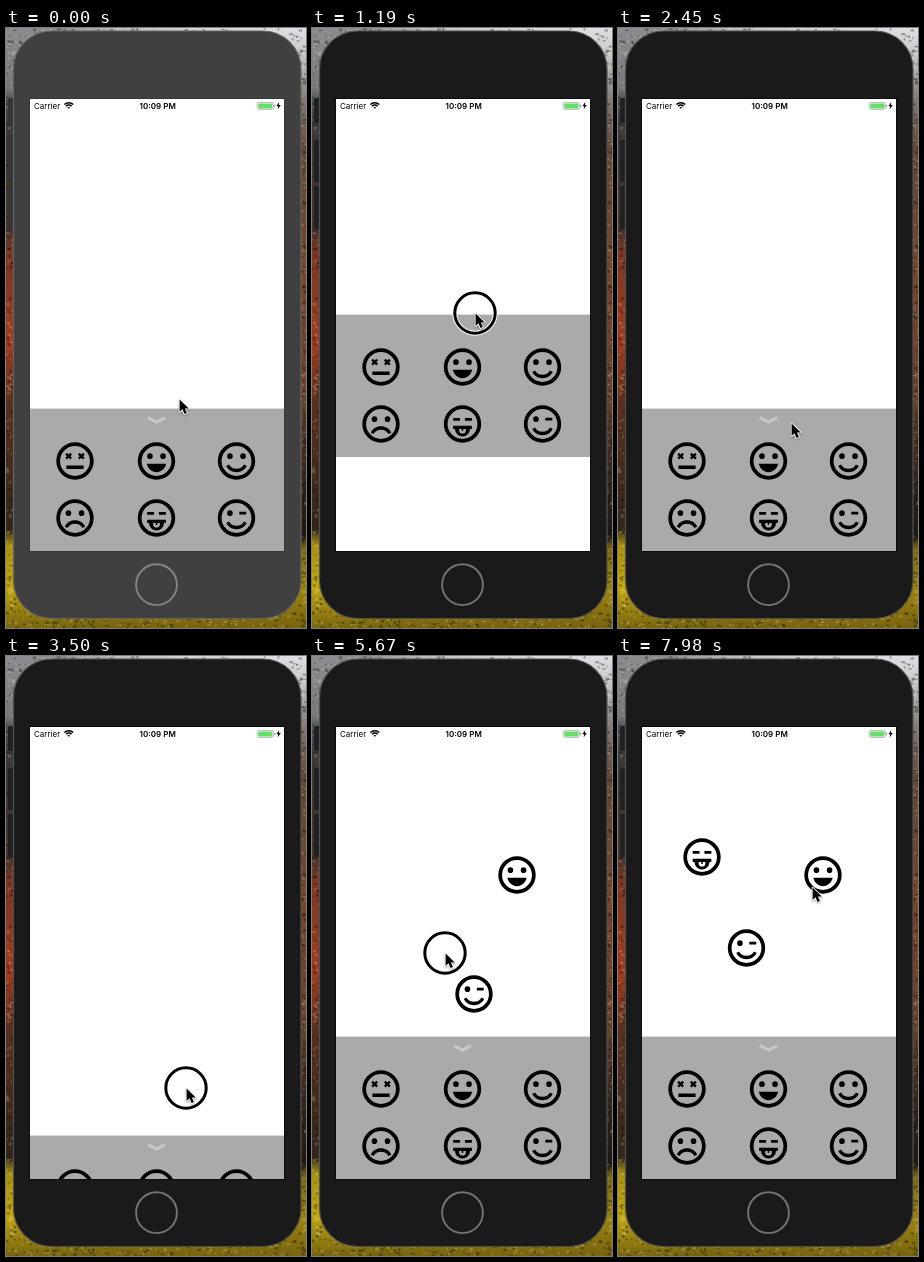
Write an HTML page with a canvas that moves like this. It is 300x600 px and loops after 8000 ms.

```html
<!DOCTYPE html>
<html lang="en">
<head>
<meta charset="utf-8">
<title>Emoticon tray</title>
<style>
  html, body { margin: 0; width: 100%; height: 100%; overflow: hidden; }
  canvas { display: block; width: 300px; height: 600px; }
</style>
</head>
<body>
<canvas id="stage" width="300" height="600"></canvas>
<script>
const canvas = document.getElementById('stage');
const ctx = canvas.getContext('2d');
const LOOP = 8000, STEP = 70, LAG = 120, FOCUS_AT = 420;
const OPEN = 381, CLOSED = 505;

// Pointer path: time, x, y
const path = [
  [0, 173, 371], [420, 173, 391], [630, 173, 391], [1070, 164, 297],
  [1190, 163, 285], [1400, 163, 285], [2100, 173, 395], [2590, 173, 395],
  [2940, 178, 505], [3000, 178, 505], [3200, 180, 511], [3290, 180, 511],
  [3380, 180, 486], [3500, 180, 432], [3600, 180, 424], [3640, 180, 424],
  [4200, 150, 437], [4250, 150, 437], [4760, 204.5, 223], [4850, 204.5, 223],
  [5240, 235, 495], [5300, 235, 495], [5550, 166.5, 343], [5670, 133, 297],
  [5800, 133, 297], [6300, 152, 494], [6350, 152, 494], [6950, 85.5, 205],
  [7050, 85.5, 205], [7700, 194, 231], [LOOP, 194, 231]
];
const trayDrags = [
  { press: 630, release: 1400, target: OPEN },
  { press: 2590, release: 3000, target: CLOSED },
  { press: 3290, release: 3640, target: OPEN }
];
const faceDrags = [
  { face: 1, press: 4250, release: 4850 },
  { face: 5, press: 5300, release: 5800 },
  { face: 4, press: 6350, release: 7050 }
];

// Faces on a 24-unit grid, filled with the even-odd rule
const dot = x => `M${x - 1.5} 9.4a1.5 1.5 0 1 1 3 0a1.5 1.5 0 1 1 -3 0Z`;
const bar = (x, y, w, h) => `M${x} ${y}h${w}v${h}h${-w}Z`;
const cross = x => `M${x - 1.8} 8.5l.9-.9.9.9.9-.9.9.9-.9.9.9.9-.9.9-.9-.9-.9.9-.9-.9.9-.9Z`;
const rim = 'M2 12a10 10 0 1 1 20 0a10 10 0 1 1 -20 0ZM4 12a8 8 0 1 0 16 0a8 8 0 1 0 -16 0Z';
const smile = 'M12 16.2C10.2 16.2 8.7 15.3 8 13.9L6.5 14.7C7.5 16.7 9.5 18 12 18S16.5 16.7 17.5 14.7L16 13.9C15.3 15.3 13.8 16.2 12 16.2Z';
const frown = 'M12 13.2C9.5 13.2 7.5 14.5 6.5 16.6L8 17.4C8.8 15.9 10.3 15.1 12 15.1S15.2 15.9 16 17.4L17.5 16.6C16.5 14.5 14.5 13.2 12 13.2Z';
const grin = 'M6.8 13.5H17.2C16.5 16.2 14.5 18 12 18S7.5 16.2 6.8 13.5Z';
const tongue = 'M7 12.9H17V14.7H16A4 4 0 0 1 8 14.7H7Z' +
  'M10.2 14.7V15.3A1.8 1.8 0 0 0 13.8 15.3V14.7H12.4V15.8H11.6V14.7Z';
const faces = [
  cross(8.6) + cross(15.4) + bar(7.4, 14.4, 9.2, 1.9),
  dot(8.5) + dot(15.5) + grin,
  dot(8.5) + dot(15.5) + smile,
  dot(8.5) + dot(15.5) + frown,
  bar(7, 8.8, 3.7, 1.5) + bar(13.3, 8.8, 3.7, 1.5) + tongue,
  dot(8.5) + bar(13.5, 8.6, 3.7, 1.5) + smile
].map(d => new Path2D(rim + d));
const arrow = new Path2D('M0 0V14.2L3.3 11.1L5.6 16.4L8.3 15.2L6 10.1H10.4Z');
const bolt = new Path2D('M273.2 74L270.4 78.2H272.3L271.6 81.4L274.8 77H272.9Z');

const clamp = (v, lo, hi) => Math.min(hi, Math.max(lo, v));
const homeOf = i => ({ x: [69, 150.5, 230.5][i % 3], y: i < 3 ? 52 : 109 });

// Monotone cubic interpolation along the pointer path
function pointerAt(t) {
  let i = 0;
  while (i < path.length - 2 && t >= path[i + 1][0]) i++;
  const a = path[i], b = path[i + 1], span = b[0] - a[0];
  const u = clamp((t - a[0]) / span, 0, 1);
  const slope = (k, c) => {
    const p = path[k - 1], q = path[k], r = path[k + 1];
    if (!p || !r || (q[c] - p[c]) * (r[c] - q[c]) <= 0) return 0;
    return (r[c] - p[c]) / (r[0] - p[0]);
  };
  const value = c => {
    const s = u * u * (3 - 2 * u);
    return a[c] + (b[c] - a[c]) * s +
      span * u * (1 - u) * ((1 - u) * slope(i, c) - u * slope(i + 1, c));
  };
  return { x: value(1), y: value(2) };
}

function dragOffset({ press, release }, t) {
  const from = pointerAt(press), to = pointerAt(clamp(t, press, release));
  return { x: to.x - from.x, y: to.y - from.y };
}

function trayAt(t) {
  let y = OPEN, rest = OPEN;
  for (const drag of trayDrags) {
    if (t < drag.press) break;
    y = rest + dragOffset(drag, t).y;
    if (t > drag.release) {
      const s = (t - drag.release) / 1000;
      y = drag.target + (y - drag.target) * Math.exp(-12 * s) * Math.cos(10 * s);
    }
    rest = drag.target;
  }
  return y;
}

function roundRect(x, y, w, h, r, fill, stroke, width = 1) {
  ctx.beginPath();
  ctx.roundRect(x, y, w, h, r);
  if (fill) { ctx.fillStyle = fill; ctx.fill(); }
  if (stroke) { ctx.strokeStyle = stroke; ctx.lineWidth = width; ctx.stroke(); }
}

function circle(x, y, r, stroke, width) {
  ctx.beginPath();
  ctx.arc(x, y, r, 0, 7);
  ctx.strokeStyle = stroke;
  ctx.lineWidth = width;
  ctx.stroke();
}

function drawFace(i, x, y) {
  ctx.save();
  ctx.translate(x, y);
  ctx.scale(1.87, 1.87);
  ctx.translate(-12, -12);
  ctx.fillStyle = '#000';
  ctx.fill(faces[i], 'evenodd');
  ctx.restore();
}

function makeWallpaper() {
  const layer = document.createElement('canvas');
  layer.width = 300;
  layer.height = 600;
  const g = layer.getContext('2d');
  const side = (x, stops) => {
    const fill = g.createLinearGradient(0, 0, 0, 600);
    stops.forEach(([at, color]) => fill.addColorStop(at / 600, color));
    g.fillStyle = fill;
    g.fillRect(x, 0, 300 - x, 600);
  };
  side(0, [[0, '#8b8d91'], [60, '#77787a'], [75, '#48484a'], [112, '#3a3635'],
    [200, '#44332c'], [225, '#7c3824'], [320, '#a03c20'], [375, '#58301f'],
    [500, '#33261c'], [518, '#a8930f'], [560, '#c0a60f'], [600, '#77640f']]);
  // The right side fades in over the middle of the top and bottom edges
  const right = [[0, '#e2e4e8'], [35, '#c0c0c2'], [70, '#85807c'], [120, '#694c3b'],
    [250, '#75492f'], [380, '#65452f'], [430, '#38291f'], [508, '#19140f'],
    [520, '#7d6a14'], [560, '#97800f'], [600, '#75600f']];
  g.globalAlpha = 0.12;
  for (let x = 60; x < 290; x += 10) side(x, right);
  g.globalAlpha = 1;
  let seed = 7;
  const random = () => (seed = seed * 16807 % 2147483647) / 2147483647;
  for (let i = 0; i < 9000; i++) {
    g.fillStyle = random() < 0.55 ? 'rgba(0,0,0,.3)' : 'rgba(255,235,180,.2)';
    g.fillRect(random() * 300, random() * 600, 1 + random() * 3, 1 + random() * 2);
  }
  return layer;
}
const wallpaper = makeWallpaper();

function drawPhone(active) {
  ctx.drawImage(wallpaper, 0, 0);
  for (const [y, h] of [[70, 25], [112, 42], [158, 43]]) {
    roundRect(2, y, 7, h, 1.5, active ? '#202022' : '#343436');
  }
  roundRect(7.5, 3, 287.5, 587.5, 38, active ? '#1a1a1a' : '#404040',
    active ? '#515151' : '#646464', 1.2);
  circle(150.5, 556.7, 20.4, active ? '#747474' : '#858585', 1.9);
  ctx.fillStyle = active ? '#0c0c0c' : '#363636';
  ctx.fillRect(23, 70, 256, 454);
  ctx.fillStyle = '#fff';
  ctx.fillRect(24, 71, 254, 452);
}

function drawStatusBar() {
  ctx.fillStyle = '#000';
  ctx.font = '400 8px Inter, sans-serif';
  ctx.fillText('Carrier', 28, 81);
  ctx.font = '600 8px Inter, sans-serif';
  ctx.textAlign = 'center';
  ctx.fillText('10:09 PM', 151.7, 81);
  ctx.textAlign = 'left';
  ctx.strokeStyle = '#000';
  ctx.lineWidth = 1.5;
  for (const r of [6.3, 3.9, 1.3]) {
    ctx.beginPath();
    ctx.arc(62.8, 81, r, -Math.PI * 0.75, -Math.PI * 0.25);
    ctx.stroke();
  }
  roundRect(251.4, 74.4, 16, 7, 1.8, null, '#9a9a9a', 0.7);
  roundRect(252.4, 75.4, 14, 5, 0.8, '#65de69');
  roundRect(268.2, 76.6, 1, 2.6, 0.5, '#9a9a9a');
  ctx.fillStyle = '#000';
  ctx.fill(bolt);
}

function drawTray(y) {
  ctx.fillStyle = '#aaa';
  ctx.fillRect(24, y - 0.4, 254, 142.4);
  ctx.globalAlpha = clamp((y - OPEN + 60) / 40, 0, 1);
  ctx.strokeStyle = '#c8c8c8';
  ctx.lineWidth = 3;
  ctx.beginPath();
  ctx.moveTo(142, y + 8.6);
  ctx.lineTo(150.5, y + 13);
  ctx.lineTo(159, y + 8.6);
  ctx.stroke();
  ctx.globalAlpha = 1;
  faces.forEach((_, i) => {
    const home = homeOf(i);
    drawFace(i, home.x, y + home.y);
  });
}

function drawPointer(t) {
  const { x, y } = pointerAt(t);
  if ([...trayDrags, ...faceDrags].some(d => t >= d.press && t < d.release)) {
    circle(x, y, 20.2, '#fff', 5);
    circle(x, y, 20.2, '#000', 3);
  }
  ctx.save();
  ctx.translate(x + 0.6, y + 0.6);
  ctx.scale(0.88, 0.88);
  ctx.lineJoin = 'round';
  ctx.shadowColor = 'rgba(0,0,0,.35)';
  ctx.shadowBlur = 2;
  ctx.shadowOffsetY = 1;
  ctx.strokeStyle = '#fff';
  ctx.lineWidth = 2;
  ctx.stroke(arrow);
  ctx.shadowColor = 'transparent';
  ctx.fillStyle = '#000';
  ctx.fill(arrow);
  ctx.restore();
}

function draw(t) {
  const late = t - LAG;
  drawPhone(t >= FOCUS_AT);
  ctx.save();
  ctx.beginPath();
  ctx.rect(24, 71, 254, 452);
  ctx.clip();
  drawStatusBar();
  drawTray(trayAt(late));
  for (const drag of faceDrags) {
    if (late < drag.press) continue;
    const home = homeOf(drag.face), offset = dragOffset(drag, late);
    drawFace(drag.face, home.x + offset.x, OPEN + home.y + offset.y);
  }
  ctx.restore();
  drawPointer(t);
}

function tick() {
  const t = performance.now() % LOOP;
  draw(Math.floor(t / STEP) * STEP);
  requestAnimationFrame(tick);
}
tick();
</script>
</body>
</html>
```
